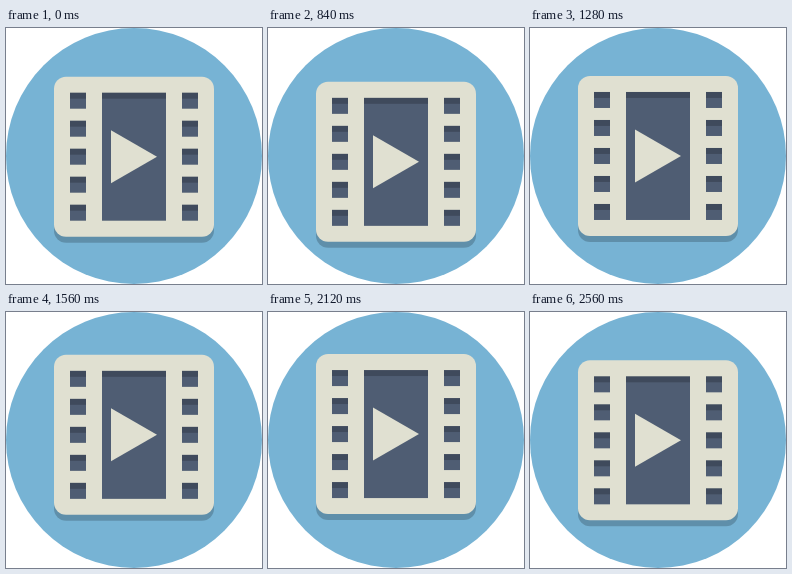
These frames come from a looping animation (256 px wide and 256 px high, 2.6 s). An HTML page with a canvas:

```html
<!DOCTYPE html>
<html lang="en">
<head>
<meta charset="utf-8">
<title>Floating film strip</title>
<style>
  html, body { margin: 0; width: 100%; height: 100%; overflow: hidden; background: #fff; }
  canvas { display: block; width: 256px; height: 256px; }
</style>
</head>
<body>
<canvas id="stage" width="256" height="256"></canvas>
<script>
const ctx = document.getElementById("stage").getContext("2d");
const LOOP = 2600, STEP = 40;
const SKY = "#77b3d4", FRAME = "#e0e0d1", GLASS = "#4f5d73", SHADE = "rgba(0, 0, 0, 0.2)";

// Vertical position of the film's top edge: [time, y]
const KEYS = [[0, 48.7], [765, 54], [1890, 40.1], [LOOP, 48.4]];

const ease = u => (1 - Math.cos(Math.PI * u)) / 2;

function filmTop(t) {
  const i = KEYS.findIndex(key => t < key[0]);
  const [t0, y0] = KEYS[i - 1], [t1, y1] = KEYS[i];
  return y0 + (y1 - y0) * ease((t - t0) / (t1 - t0));
}

function plate(y, color) {
  ctx.fillStyle = color;
  ctx.beginPath();
  ctx.roundRect(48, y, 160, 160, 12);
  ctx.fill();
}

function opening(x, y, w, h) {
  ctx.fillStyle = GLASS;
  ctx.fillRect(x, y, w, h);
  ctx.fillStyle = SHADE;
  ctx.fillRect(x, y, w, 6);
}

function draw(t) {
  ctx.fillStyle = "#fff";
  ctx.fillRect(0, 0, 256, 256);
  ctx.fillStyle = SKY;
  ctx.beginPath();
  ctx.arc(128, 128, 128, 0, Math.PI * 2);
  ctx.fill();

  const y = filmTop(t);
  plate(y + 6, SHADE);
  plate(y, FRAME);
  opening(96, y + 16, 64, 128);
  for (let i = 0; i < 5; i++) {
    for (const x of [64, 176]) opening(x, y + 16 + i * 28, 16, 16);
  }

  ctx.fillStyle = FRAME;
  ctx.beginPath();
  ctx.moveTo(105, y + 53.5);
  ctx.lineTo(151, y + 80);
  ctx.lineTo(105, y + 106.5);
  ctx.fill();
}

const start = performance.now();
function tick() {
  const t = (performance.now() - start) % LOOP;
  draw(Math.floor(t / STEP) * STEP);
  requestAnimationFrame(tick);
}
tick();
</script>
</body>
</html>
```
